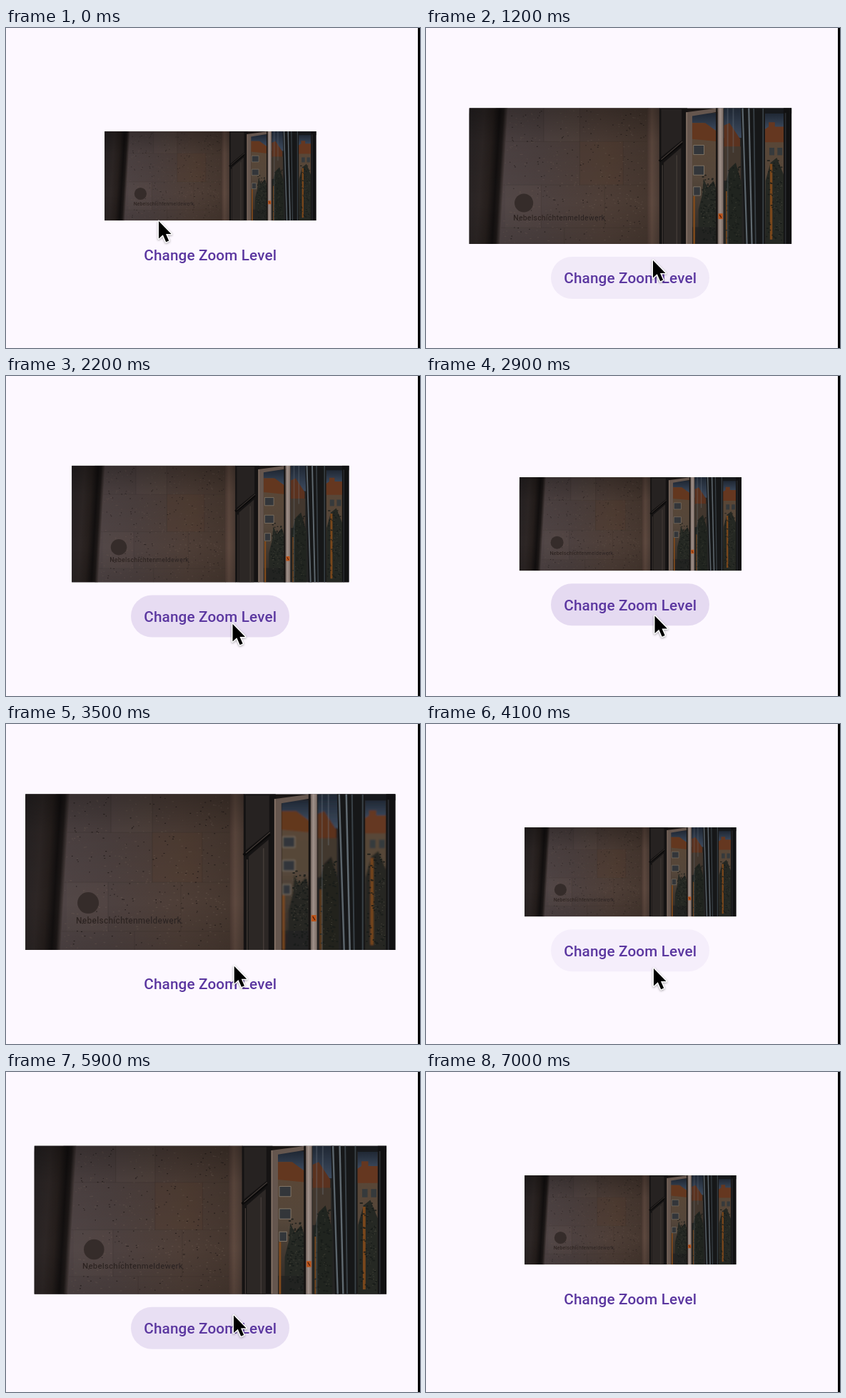
Animation of 580x449 px, one loop 7100 ms. Source, as an HTML page:

```html
<!DOCTYPE html>
<html lang="en">
<head>
<meta charset="utf-8">
<title>Change Zoom Level</title>
<style>
  html, body { margin: 0; width: 100%; height: 100%; overflow: hidden; background: #fdf8ff; }
  svg { display: block; width: 580px; height: 449px; }
  .label { font: 500 20.7px Roboto, sans-serif; letter-spacing: .15px; fill: #5b37a0; text-anchor: middle; }
  .sign { font: 500 12px Roboto, sans-serif; letter-spacing: .25px; fill: #2a2221; filter: drop-shadow(.6px .9px 0 #66544c); }
  #cursor { filter: drop-shadow(0 1.5px 1.5px rgba(0, 0, 0, .35)); }
</style>
</head>
<body>
<svg viewBox="0 0 580 449">
  <defs>
    <linearGradient id="blur">
      <stop offset="0" stop-color="#262223"/><stop offset=".4" stop-color="#2d2625"/>
      <stop offset=".62" stop-color="#251e1c"/><stop offset=".8" stop-color="#120f0f"/>
      <stop offset=".9" stop-color="#1d1817"/><stop offset="1" stop-color="#4a3f3e"/>
    </linearGradient>
    <linearGradient id="wall">
      <stop offset="0" stop-color="#504546"/><stop offset=".3" stop-color="#4d4140"/>
      <stop offset=".7" stop-color="#4e3e37"/><stop offset="1" stop-color="#46372f"/>
    </linearGradient>
    <linearGradient id="shade" x2="0" y2="1">
      <stop offset="0" stop-color="#000" stop-opacity=".3"/><stop offset=".25" stop-color="#000" stop-opacity=".08"/>
      <stop offset=".7" stop-color="#000" stop-opacity="0"/><stop offset="1" stop-color="#000" stop-opacity=".12"/>
    </linearGradient>
    <linearGradient id="pillar">
      <stop offset="0" stop-color="#4c3a33"/><stop offset=".35" stop-color="#5e493f"/><stop offset="1" stop-color="#493a33"/>
    </linearGradient>
    <linearGradient id="metal">
      <stop offset="0" stop-color="#6b5d57"/><stop offset=".4" stop-color="#a0918a"/><stop offset="1" stop-color="#7b6c65"/>
    </linearGradient>
    <linearGradient id="sky" x2="0" y2="1">
      <stop offset="0" stop-color="#1f2733"/><stop offset="1" stop-color="#3c4a5e"/>
    </linearGradient>
    <linearGradient id="facade" x2="0" y2="1">
      <stop offset="0" stop-color="#5c4735"/><stop offset=".5" stop-color="#54463a"/><stop offset="1" stop-color="#2a2724"/>
    </linearGradient>
    <filter id="soft"><feGaussianBlur stdDeviation=".8"/></filter>
    <clipPath id="frame"><rect x="27" y="98" width="519" height="219"/></clipPath>
  </defs>

  <rect width="580" height="449" fill="#fdf8ff"/>

  <g id="photo"><g clip-path="url(#frame)">
    <rect x="27" y="98" width="519" height="219" fill="#191514"/>
    <rect x="70" y="98" width="245" height="219" fill="url(#wall)"/>
    <path d="M147 98h58v54h-58zM85 222h58v70h-58z" fill="#80706a" opacity=".07"/>
    <path d="M205 152h70v70h-70z" fill="#5a3c2c" opacity=".2"/>
    <path d="M85 152H314M80 222H314M78 291H314M147 98V152M205 98V222M275 152V222M143 222V291M245 222V291M180 291V317"
          fill="none" stroke="#2c2321" stroke-opacity=".25" stroke-width=".8"/>
    <g fill="none" stroke-width="1.2" stroke-linecap="round">
      <path id="grain" stroke="#77645a" stroke-opacity=".35"/>
      <path id="pits" stroke="#1d1615" stroke-opacity=".75"/>
    </g>
    <g transform="translate(0 98) skewX(-3.4)"><rect x="27" width="62" height="219" fill="url(#blur)"/></g>
    <path d="M27 98V317H14Z" fill="#262223"/>
    <rect x="314" y="98" width="20" height="219" fill="url(#pillar)"/>
    <rect x="27" y="98" width="307" height="219" fill="url(#shade)"/>
    <circle cx="115" cy="251" r="15" fill="#352c2a"/>
    <text class="sign" x="98" y="279.5">Nebelschichtenmeldewerk</text>

    <rect x="333" y="98" width="45" height="219" fill="#151313"/>
    <path d="M336 100H369V150L336 177Z" fill="#262221"/>
    <path d="M340 186L368 162V317H340Z" fill="#2c2725"/>
    <path d="M333 184L370 154" stroke="#0b0a0a" stroke-width="4"/>
    <path d="M336 181L370 152M361 174V317M338 190V317" fill="none" stroke="#4a413d" stroke-width="1.2"/>

    <g filter="url(#soft)">
      <rect x="386" y="106" width="41" height="211" fill="url(#facade)"/>
      <path d="M386 106H427V136L404 122H386Z" fill="url(#sky)"/>
      <path d="M386 122H407L427 137V152L386 148Z" fill="#63371f"/>
      <path d="M388 158h17v15h-17zM388 191h17v15h-17zM388 225h11v14h-11z" fill="#33363a" stroke="#857a6b"/>
      <path d="M396 317V262L402 238L404 212L411 226L420 215L427 236V317Z" fill="#252823"/>
      <rect x="386" y="290" width="41" height="27" fill="#222221" opacity=".7"/>
      <path d="M389 240V317" stroke="#804a1c" stroke-width="3"/>

      <rect x="436" y="98" width="41" height="219" fill="#242423"/>
      <rect x="437" y="98" width="30" height="48" fill="url(#sky)"/>
      <path d="M437 126L446 122L463 148V163H437Z" fill="#5b321f"/>
      <path d="M437 160H464V215H437Z" fill="#42372e"/>
      <path d="M439 317V222L446 196L456 186L466 222V317Z" fill="#20241f"/>
      <path d="M441 232V317" stroke="#75461e" stroke-width="2"/>

      <rect x="503" y="106" width="30" height="211" fill="url(#facade)"/>
      <rect x="503" y="106" width="30" height="26" fill="url(#sky)"/>
      <path d="M503 132L509 128V121H519V128H533V153H503Z" fill="#653720"/>
      <path d="M510 162h8v12h-8zM523 162h8v12h-8z" fill="#363a3c"/>
      <path d="M504 317V215L512 186L522 178L533 205V317Z" fill="#252823"/>
      <path d="M513 188V310" stroke="#7a471b" stroke-width="4"/>
    </g>
    <g fill="none" stroke-width="2" stroke-linecap="round">
      <path id="leaves" stroke="#171b18" stroke-opacity=".8"/>
      <path id="glints" stroke="#5f5b4c" stroke-opacity=".5" stroke-width="1"/>
    </g>
    <path d="M376 105L428 98V104L386 111V317H376Z" fill="#65564e"/>
    <path d="M377 105V317" stroke="#8a776b" stroke-width="1.5"/>
    <rect x="424" y="98" width="3" height="219" fill="#171413"/>
    <rect x="427" y="98" width="9" height="219" fill="url(#metal)"/>
    <path d="M428 268h7v9h-7z" fill="#b9531a"/>
    <path d="M430 270l3 5" stroke="#4a1b08" stroke-width="1.3"/>
    <path d="M443 98V317M452 98V170" stroke="#77828a" stroke-opacity=".3" stroke-width="2"/>

    <path d="M464 98H503V317H470Z" fill="#161718"/>
    <path d="M467 98L474 317" stroke="#5b656c" stroke-width="2.5"/>
    <path d="M477 98L482 317" stroke="#606a71" stroke-width="2.5"/>
    <path d="M485 98L488 317M500 98V317" stroke="#394147" stroke-width="2"/>
    <path d="M503 98H546V107H503Z" fill="#17191c"/>
    <rect x="533" y="98" width="13" height="219" fill="#111112"/>
    <path d="M536 106V317" stroke="#2b2d31" stroke-width="2"/>
  </g></g>

  <g id="button">
    <rect id="pill" x="175" y="18" width="222" height="59" rx="29.5" fill="#6a40a8"/>
    <text class="label" x="286.2" y="55.45">Change Zoom Level</text>
  </g>
  <path id="cursor" d="M0 1V25.5L5.8 20.3L10.2 30.2L14.2 28.4L10 19H17.5Z"
        fill="#000" stroke="#fff" stroke-width="3" stroke-linejoin="round" paint-order="stroke"/>
  <rect x="577" width="3" height="449" fill="#000"/>
</svg>
<script>
const LOOP = 7100, STEP = 100, ZOOM_MS = 300;
const PHOTO_W = 519, SMALL = 296.5, LARGE = 518.5, RATIO = 219 / PHOTO_W, CX = 286.4, CY = 207.6;
const ZOOMS = [1014, 2035, 2846, 3670, 4580, 5830];
const HIDE_CURSOR = 6300;

const hover = [
  [0, 0], [400, 0], [700, .08], [900, .08], [1014, .17], [1100, .15], [1200, .08], [1300, 0],
  [1900, 0], [2035, .14], [2200, .15], [2500, .08], [2700, .08], [2900, .16], [3100, 0],
  [3500, 0], [3670, .14], [3900, .1], [4000, .03], [4100, .05], [4300, .08], [4580, .16],
  [4700, .12], [4800, .05], [4900, 0], [5700, 0], [5830, .15], [6100, .1], [6300, 0]
];
const pointer = [
  [0, 214, 270], [200, 245, 308], [500, 312, 344], [700, 318, 342], [900, 318, 336],
  [1200, 318, 325], [1700, 318, 328], [2000, 317, 346], [2200, 317.5, 347],
  [2900, 320.5, 335.5], [4100, 319, 342], [5000, 319, 340.5]
];

const $ = id => document.getElementById(id);
const photo = $('photo'), button = $('button'), pill = $('pill'), cursor = $('cursor');

function at(keys, t) {
  const i = keys.findIndex(k => k[0] > t);
  if (i < 0) return keys[keys.length - 1].slice(1);
  const a = keys[i - 1], b = keys[i], p = (t - a[0]) / (b[0] - a[0]);
  return a.slice(1).map((v, n) => v + (b[n + 1] - v) * p);
}

// Cubic ease-in-out with control points (.42, 0) and (.58, 1).
function ease(x) {
  let lo = 0, hi = 1;
  for (let i = 0; i < 24; i++) {
    const u = (lo + hi) / 2, v = 1 - u;
    if (1.26 * v * v * u + 1.74 * v * u * u + u * u * u < x) lo = u; else hi = u;
  }
  return lo * lo * (3 - 2 * lo);
}

// Each click toggles the size, so alternate the sign.
function zoomAt(t) {
  return ZOOMS.reduce((z, start, i) => {
    const p = Math.min(1, Math.max(0, (t - start) / ZOOM_MS));
    return z + (i % 2 ? -1 : 1) * ease(p);
  }, 0);
}

let seed = 7;
const rand = () => (seed = seed * 16807 % 2147483647) / 2147483647;

// Strews short horizontal flecks over a box.
function flecks(n, x, y, w, h, len) {
  let d = '';
  for (let i = 0; i < n; i++) {
    d += `M${(x + rand() * w).toFixed(1)} ${(y + rand() * h).toFixed(1)}h${(rand() * len).toFixed(1)}`;
  }
  return d;
}

function addTexture() {
  const set = (id, d) => $(id).setAttribute('d', d);
  set('grain', flecks(300, 82, 102, 230, 213, 2));
  set('pits', flecks(190, 92, 102, 220, 211, 1.2));
  set('leaves', flecks(80, 400, 205, 23, 110, 2) + flecks(60, 440, 190, 24, 125, 2) + flecks(70, 505, 180, 26, 135, 2));
  set('glints', flecks(45, 400, 215, 23, 95, 1) + flecks(30, 440, 200, 24, 110, 1) + flecks(45, 516, 185, 15, 125, 1));
}

function draw(t) {
  const w = SMALL + (LARGE - SMALL) * zoomAt(t), h = w * RATIO;
  const x = CX - w / 2, y = CY - h / 2;
  photo.setAttribute('transform', `translate(${x} ${y}) scale(${w / PHOTO_W}) translate(-27 -98)`);
  button.setAttribute('transform', `translate(0 ${y + h})`);
  pill.setAttribute('fill-opacity', at(hover, t)[0]);
  cursor.setAttribute('transform', `translate(${at(pointer, t).join(' ')})`);
  cursor.style.visibility = t < HIDE_CURSOR ? 'visible' : 'hidden';
}

const begin = performance.now();
function tick() {
  const t = (performance.now() - begin) % LOOP;
  draw(Math.floor(t / STEP) * STEP);
  requestAnimationFrame(tick);
}

addTexture();
tick();
</script>
</body>
</html>
```
